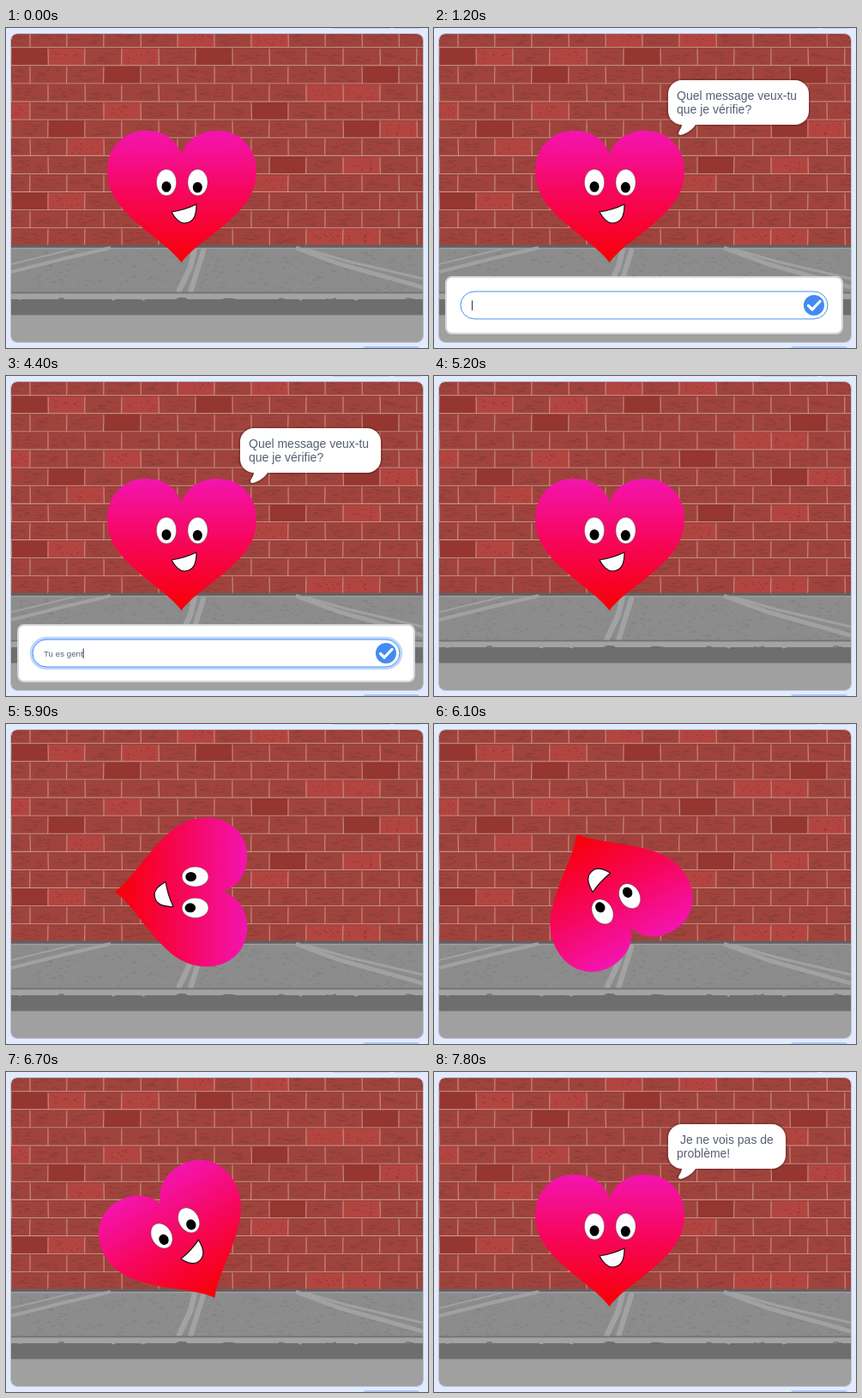
These frames come from a looping animation (492 px wide and 374 px high, 8000 ms). An HTML page with a canvas:

```html
<!DOCTYPE html>
<html lang="fr">
<head>
<meta charset="utf-8">
<title>Cœur vérificateur</title>
<style>
  html, body { margin: 0; width: 100%; height: 100%; overflow: hidden; background: #e2ebfd; }
  canvas, svg { position: absolute; left: 0; top: 0; display: block; }
  text { font-family: "Liberation Sans", Arial, sans-serif; fill: #575e75; white-space: pre; }
  .say text { font-size: 14px; }
  #typed { font-size: 9.75px; }
</style>
</head>
<body>
<canvas id="wall" width="492" height="374"></canvas>
<svg width="492" height="374" viewBox="0 0 492 374">
  <defs>
    <linearGradient id="pink" gradientUnits="userSpaceOnUse" x1="0" y1="120" x2="0" y2="274">
      <stop offset="0" stop-color="#f414b0"/>
      <stop offset=".5" stop-color="#f60656"/>
      <stop offset="1" stop-color="#f80004"/>
    </linearGradient>
  </defs>
  <g id="heart">
    <path fill="url(#pink)" d="M204.500 148C199 130 183 120 163 120C137 120 118 140 118 167C118 196 135.500 213 160 234C177 248.500 193 259 204.500 274C216 259 232 248.500 250 234C275 213 292 196 292 167C292 140 273 120 247 120C227 120 210 130 204.500 148Z"/>
    <g fill="#fff" stroke="#300" stroke-width=".4">
      <ellipse cx="187" cy="180.500" rx="11.700" ry="15.500"/>
      <ellipse cx="223.500" cy="180.500" rx="11.700" ry="15.500"/>
    </g>
    <ellipse cx="187" cy="185.500" rx="5.500" ry="6.300"/>
    <ellipse cx="223.300" cy="186.300" rx="5.500" ry="6.300"/>
    <path fill="#fff" stroke="#111" stroke-width="1.200" stroke-linejoin="round" d="M193 215Q209 212.500 222 206C222 219 219 227.500 208 228C202 228 197.500 223.500 193 215Z"/>
  </g>
  <g id="question" class="say">
    <path/>
    <text x="283" y="83.600">Quel message veux-tu</text>
    <text x="283" y="99.600">que je vérifie?</text>
  </g>
  <g id="answer" class="say">
    <path/>
    <text x="286.900" y="83.600">Je ne vois pas de</text>
    <text x="283" y="99.600">problème!</text>
  </g>
  <g id="panel">
    <rect x="14" y="291" width="462" height="66" rx="7" fill="#fff" stroke="#d5d6d8" stroke-width="2"/>
    <rect id="ring" x="31" y="308" width="428" height="32" rx="16" fill="none" stroke="#bcd7ff"/>
    <rect x="31" y="308" width="428" height="32" rx="16" fill="#fff" stroke="#4c8ff0"/>
    <text id="typed" x="44" y="328"></text>
    <rect id="caret" y="318.500" width="1" height="11.500" fill="#333"/>
    <circle cx="443" cy="324" r="12" fill="#438bf2"/>
    <path d="M436.500 324.500L441 329L450 319.500" fill="none" stroke="#fff" stroke-width="3.200" stroke-linecap="round" stroke-linejoin="round"/>
  </g>
</svg>
<script>
const LOOP = 8000;
const $ = id => document.getElementById(id);
const ctx = $('wall').getContext('2d');

let seed = 7;
const rnd = (a, b) => {
  seed = (seed * 1664525 + 1013904223) % 4294967296;
  return a + (b - a) * seed / 4294967296;
};
const rect = (c, x, y, w, h) => { ctx.fillStyle = c; ctx.fillRect(x, y, w, h); };
const line = (c, w, ...p) => {
  ctx.strokeStyle = c;
  ctx.lineWidth = w;
  ctx.beginPath();
  for (let i = 0; i < p.length; i += 2) ctx.lineTo(p[i], p[i + 1]);
  ctx.stroke();
};
const dash = (c, w, x, y, len) =>
  line(c, w, x, y, x + len * .35, y + rnd(-1.3, 1.3), x + len * .7, y + rnd(-1, 1), x + len, y + rnd(-1, 1));

// brick shades, keyed by "row,column"
const LIGHT = '0,4 0,6 1,0 1,2 3,7 3,8 4,-1 4,2 5,9 6,1 7,8 8,6 9,0 11,7 11,8'.split(' ');
const DARK = '1,-1 1,4 2,2 2,9 4,6 5,0 5,8 7,6 9,-1'.split(' ');

function drawBricks() {
  const pitch = 43, high = 21.1;
  for (let r = 0; r < 12; r++) {
    const y = 1.7 + r * high;
    for (let k = -2; k < 11; k++) {
      const x = (r % 2 ? 49 : 28) + k * pitch, key = r + ',' + k;
      const light = LIGHT.includes(key), dark = DARK.includes(key);
      rect(light ? '#b34541' : dark ? '#963630' : '#a0433d', x, y, pitch, high);
      if (light) {
        for (let i = 0; i < 14; i++) dash('#943a37', 1, x + rnd(4, 37), y + rnd(5, 18), rnd(1, 3));
      } else if (!dark) {
        for (let i = 0; i < 10; i++) dash('#8f3e3a', 1.2, x + rnd(3, 31), y + rnd(5, 18), rnd(4, 10));
      }
      line('#c69083', 1.1, x, y, x + rnd(-.5, .5), y + high);
    }
    line('#cb978a', 1.1, 6, y, 486, y);
    line('#853732', .7, 6, y + 1, 486, y + 1);
  }
}

function drawPavement() {
  rect('#626060', 6, 253.500, 480, 4);
  rect('#8c8c8c', 6, 257, 480, 54);
  for (let i = 0; i < 330; i++) dash('#7f7f7f', .9, rnd(6, 484), rnd(259, 308), rnd(1, 6));
  line('#a0a0a0', 1.5, 6, 257.500, 486, 257.500);
  line('#a1a1a1', 4, 6, 285, 70, 269, 122, 257);
  line('#a1a1a1', 2, 6, 276, 80, 258);
  line('#a2a2a2', 6.5, 220, 258, 215, 279, 201, 309);
  line('#a2a2a2', 6, 231, 258, 224, 280, 215, 309);
  line('#a1a1a1', 5, 338, 257, 390, 276, 486, 303);
  line('#a1a1a1', 3, 348, 258, 400, 273, 486, 293);
  rect('#747474', 6, 308.500, 480, 2);
  rect('#a3a3a3', 6, 310.500, 480, 6.5);
  rect('#6e6e6e', 6, 317, 480, 19);
  for (let i = 0; i < 7; i++) dash('#6e6e6e', 1.2, rnd(6, 470), 316.500, rnd(5, 14));
  for (let i = 0; i < 5; i++) dash('#a3a3a3', 1.5, rnd(6, 470), 317, rnd(4, 9));
  rect('#a0a0a0', 6, 335.500, 480, 32);
}

function drawStage() {
  rect('#e2ebfd', 0, 0, 492, 374);
  rect('#c9d0e5', 381, 0, 66, 1);
  rect('#c9d0e5', 453, 0, 31, 1);
  ctx.fillStyle = '#adc8fc';
  ctx.beginPath();
  ctx.roundRect(416, 372, 66, 8, 3);
  ctx.fill();
  ctx.save();
  ctx.beginPath();
  ctx.roundRect(6, 7, 480, 360, 7);
  ctx.clip();
  drawBricks();
  drawPavement();
  ctx.restore();
  ctx.strokeStyle = '#b9bfcd';
  ctx.lineWidth = 1;
  ctx.beginPath();
  ctx.roundRect(5.500, 6.500, 481, 361, 7.500);
  ctx.stroke();
}

function shapeBubble(id, w) {
  const path = $(id).querySelector('path');
  path.setAttribute('d', `M289 113C289 117 285 121 285 123Q285 125 287 125C290 125 300 121 305 113
    H${257 + w}a16 16 0 0 0 16 -16V77a16 16 0 0 0 -16 -16H289a16 16 0 0 0 -16 16V97a16 16 0 0 0 16 16Z`);
  path.setAttribute('style', 'fill:#fff;stroke:rgba(0,0,0,.15);stroke-width:4;paint-order:stroke');
}

const ASK = [1200, 5000], REPLY = 6900, SPIN = 5600;
const MESSAGE = 'Tu es gentil';
// [time, letters typed]
const KEYS = [[2100, 1], [2400, 2], [2600, 3], [3100, 4], [3500, 5], [3700, 6],
  [4100, 8], [4200, 9], [4400, 10], [4500, 11], [4700, 12]];
const BLINKS = [[1600, 1900], [2900, 3100], [3900, 4100]];

const within = (t, [a, b]) => t >= a && t < b;
const show = (id, on) => $(id).setAttribute('visibility', on ? 'visible' : 'hidden');

function render(t) {
  const asking = within(t, ASK);
  show('question', asking);
  show('panel', asking);
  show('answer', t >= REPLY);

  const count = KEYS.reduce((n, [at, len]) => t >= at ? len : n, 0);
  const text = MESSAGE.slice(0, count);
  if ($('typed').textContent !== text) $('typed').textContent = text;
  ctx.font = '9.75px "Liberation Sans", Arial, sans-serif';
  $('caret').setAttribute('x', 44 + ctx.measureText(text).width);
  show('caret', asking && !BLINKS.some(b => within(t, b)));
  const focus = Math.min(1, Math.max(0, Math.floor((t - ASK[0]) / 100) / 2));
  $('ring').setAttribute('stroke-width', 6.5 * focus);

  // one full turn in twelve steps
  const step = Math.min(12, Math.max(0, Math.floor((t - SPIN) / 100)));
  $('heart').setAttribute('transform', `rotate(${step * 30 % 360} 204.8 196.3)`);
}

drawStage();
shapeBubble('question', 164);
shapeBubble('answer', 137);

const start = performance.now();
function tick() {
  render((performance.now() - start) % LOOP);
  requestAnimationFrame(tick);
}
tick();
</script>
</body>
</html>
```
